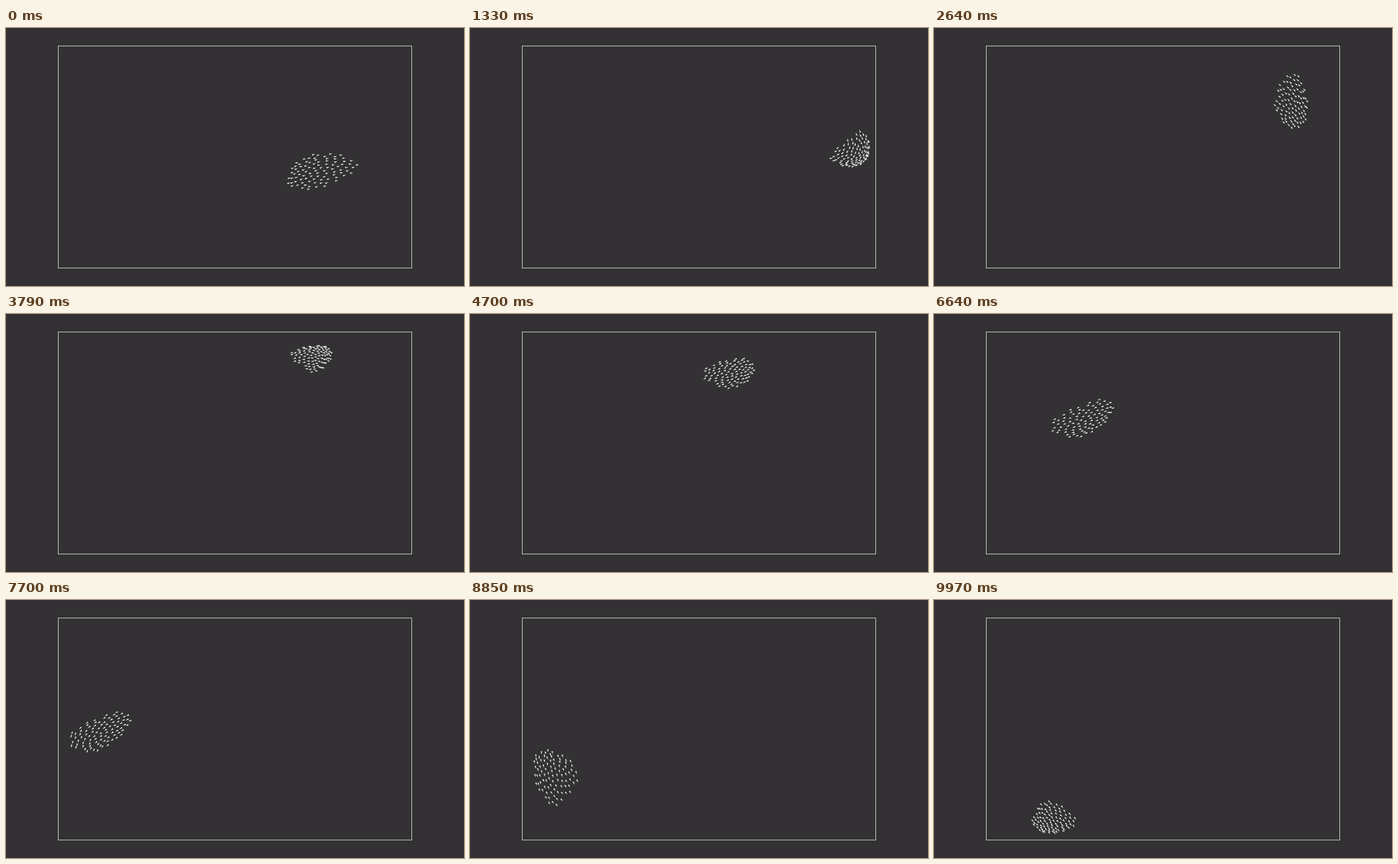
Animation, 600 px wide and 338 px high, one loop 10 s. Source, as an HTML page with a canvas:

```html
<!DOCTYPE html>
<html lang="en">
<head>
<meta charset="utf-8">
<title>Flock</title>
<style>
  html, body { margin: 0; width: 100%; height: 100%; overflow: hidden; background: #333133; }
  canvas { display: block; }
</style>
</head>
<body>
<canvas id="stage" width="600" height="338"></canvas>
<script>
const ctx = document.getElementById('stage').getContext('2d');
const LOOP = 10000;
const COUNT = 90;
const GOLDEN = Math.PI * (3 - Math.sqrt(5));
const BOX = { left: 68, top: 23.6, right: 532, bottom: 314.4 };

// Flight path: time, centre x and y, half width, half height, tilt
const PATH = [
  [0, 416, 185.5, 46, 25, -.35],
  [1330, 500, 161, 26, 24, -.4],
  [2640, 467, 94, 22, 37, .05],
  [3790, 399, 59, 28, 18, 0],
  [5580, 274, 108.5, 39, 25, -.35],
  [7700, 118, 176.5, 41, 27, -.55],
  [8800, 112, 232, 30, 37, .1],
  [LOOP, 158, 286, 29, 21, .1]
];

const noise = n => {
  const s = Math.sin(n * 127.1) * 43758.5453;
  return s - Math.floor(s) - .5;
};

// Evenly packed places in a unit disc
const birds = Array.from({ length: COUNT }, (_, i) => {
  const radius = Math.sqrt((i + .5) / COUNT);
  const angle = i * GOLDEN + noise(i) * .15;
  return {
    u: radius * Math.cos(angle),
    v: radius * Math.sin(angle),
    inner: 1 - radius * radius,
    turn: noise(i + 200) * .2
  };
});

function slope(k, c) {
  const a = PATH[Math.max(k - 1, 0)];
  const b = PATH[Math.min(k + 1, PATH.length - 1)];
  return (b[c] - a[c]) / (b[0] - a[0]);
}

// Cubic Hermite interpolation along the path
function flockAt(t) {
  let k = 0;
  while (k < PATH.length - 2 && t >= PATH[k + 1][0]) k++;
  const a = PATH[k], b = PATH[k + 1];
  const span = b[0] - a[0];
  const p = (t - a[0]) / span;
  const ease = p * p * (3 - 2 * p);
  return a.map((value, c) => value + (b[c] - value) * ease
    + span * p * (1 - p) * ((1 - p) * slope(k, c) - p * slope(k + 1, c)));
}

function headingAt(t) {
  const time = Math.min(Math.max(t, 0), LOOP);
  const [, x0, y0] = flockAt(time - 20);
  const [, x1, y1] = flockAt(time + 20);
  return Math.atan2(y1 - y0, x1 - x0);
}

// Birds bunch up at the tail and against a nearby wall
const wallPush = gap => 1.4 * Math.max(0, 1 - gap / 50);
const egg = (value, crowd, across) => value * (1 + crowd * across) / (1 + crowd * crowd / 2);

function drawBird(x, y, heading) {
  ctx.save();
  ctx.translate(x, y);
  ctx.rotate(heading);
  ctx.beginPath();
  ctx.moveTo(2.2, 0);
  ctx.lineTo(-1.8, .9);
  ctx.lineTo(-1.8, -.9);
  ctx.fill();
  ctx.restore();
}

function draw() {
  const t = performance.now() % LOOP;
  const [, cx, cy, halfWidth, halfHeight, tilt] = flockAt(t);
  const heading = headingAt(t);
  const dx = Math.cos(heading), dy = Math.sin(heading);
  const crowdX = wallPush(BOX.right - cx) - wallPush(cx - BOX.left) - .3 * dx;
  const crowdY = wallPush(BOX.bottom - cy) - wallPush(cy - BOX.top) - .3 * dy;

  ctx.fillStyle = '#333133';
  ctx.fillRect(0, 0, 600, 338);
  ctx.strokeStyle = '#b4b4b4';
  ctx.strokeRect(BOX.left + .5, BOX.top, BOX.right - BOX.left - 1, BOX.bottom - BOX.top);

  ctx.fillStyle = '#fff';
  for (const { u, v, inner, turn } of birds) {
    const w = tilt * u + Math.sqrt(1 - tilt * tilt) * v;
    const x = egg(u, crowdY, w) + crowdX * inner;
    const y = egg(w, crowdX, u) + crowdY * inner;
    // Leaders turn first, the tail follows
    const lead = 500 * (x * dx + y * dy);
    drawBird(cx + halfWidth * x, cy + halfHeight * y, headingAt(t + lead) + turn);
  }
  requestAnimationFrame(draw);
}
draw();
</script>
</body>
</html>
```
